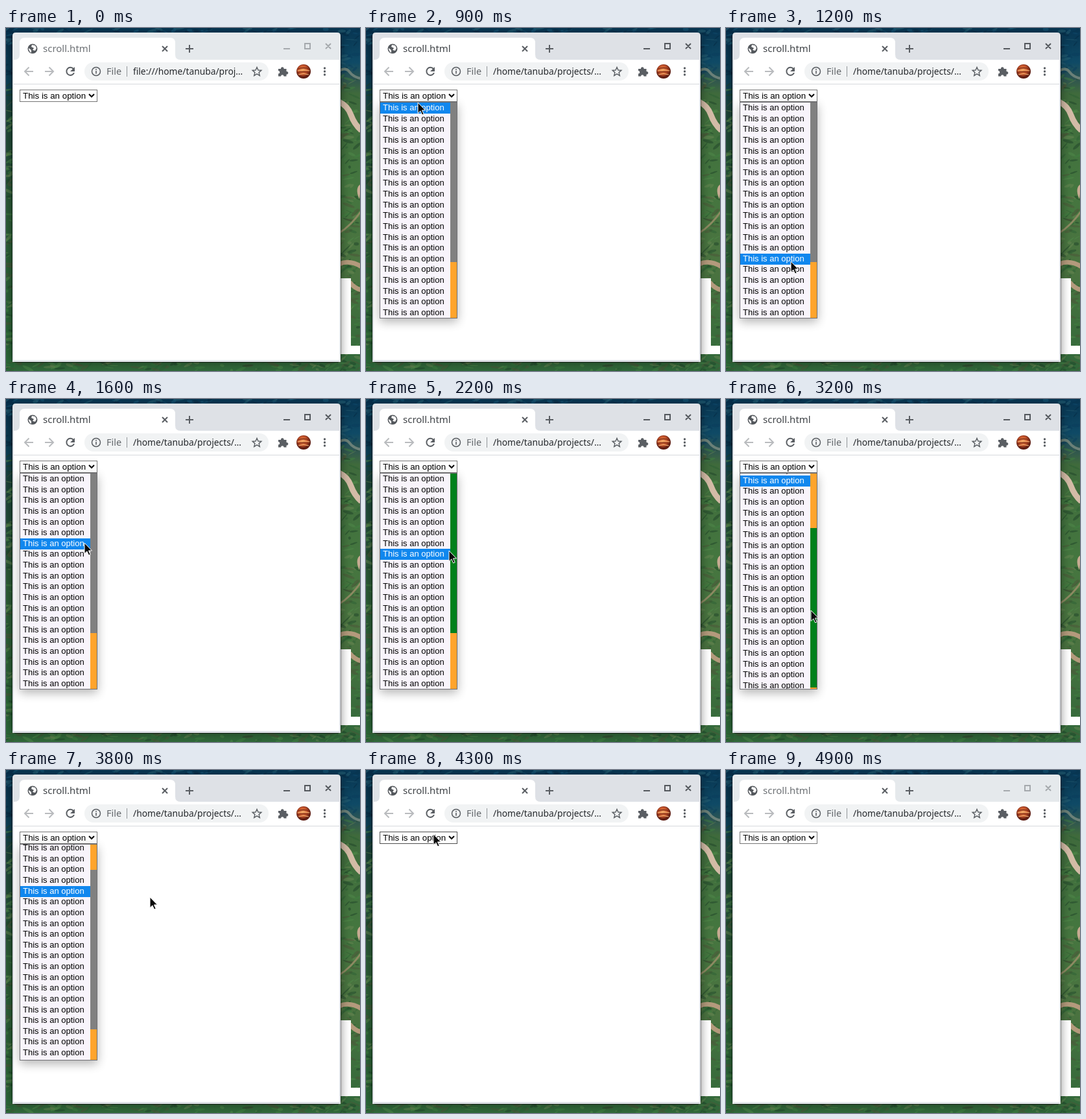
These frames come from a looping animation (546x529 px, 5 s). An HTML page:

```html
<!DOCTYPE html>
<html lang="en">
<head>
<meta charset="utf-8">
<title>Scrolling select</title>
<style>
html, body { margin: 0; width: 100%; height: 100%; overflow: hidden; }
svg { display: block; }
#stage { --bar: #dee1e6; --title: #3f4347; --ctl: #54585d; }
#stage.idle { --bar: #e5e9ec; --title: #6d7175; --ctl: #a5a9ad; }
.bar { fill: var(--bar); }
.ui { font-family: "Noto Sans", "Open Sans", sans-serif; }
.form { font-family: "Liberation Sans", Arial, sans-serif; }
.line { fill: none; stroke: #5a5e63; stroke-width: 2; }
.control { fill: none; stroke: var(--ctl); stroke-width: 2; }
.off { stroke: #b9bbbe; }
</style>
</head>
<body>
<svg id="stage" width="546" height="529" viewBox="0 0 546 529">
  <defs>
    <linearGradient id="land" x2="0" y2="1">
      <stop offset="0" stop-color="#073450"/>
      <stop offset=".1" stop-color="#0f4a66"/>
      <stop offset=".15" stop-color="#2f5550"/>
      <stop offset=".19" stop-color="#3f6a3c"/>
      <stop offset=".45" stop-color="#44763f"/>
      <stop offset=".7" stop-color="#4b7340"/>
      <stop offset="1" stop-color="#30683a"/>
    </linearGradient>
    <linearGradient id="coast" x2="0" y2="1">
      <stop offset="0" stop-color="#062c47"/>
      <stop offset=".16" stop-color="#0c3f55"/>
      <stop offset=".24" stop-color="#1c4439"/>
      <stop offset=".55" stop-color="#2c5c36"/>
      <stop offset="1" stop-color="#2b6637"/>
    </linearGradient>
    <radialGradient id="ball" cx=".45" cy=".4">
      <stop offset="0" stop-color="#f2a05a"/>
      <stop offset=".6" stop-color="#c9552a"/>
      <stop offset="1" stop-color="#5d1c12"/>
    </radialGradient>
    <filter id="blur" x="-50%" y="-50%" width="200%" height="200%"><feGaussianBlur stdDeviation="8"/></filter>
    <filter id="soft"><feGaussianBlur stdDeviation=".7"/></filter>
  </defs>

  <!-- Desktop -->
  <rect width="546" height="529" fill="url(#land)"/>
  <rect width="12" height="529" fill="url(#coast)"/>
  <g filter="url(#soft)">
    <g id="patches"></g>
    <path d="M514 66Q524 60 530 68T548 78" fill="none" stroke="#6b8078" stroke-width="4"/>
    <path d="M514 114Q527 120 532 134T548 158" fill="none" stroke="#d3bba6" stroke-width="9"/>
    <path d="M514 364Q530 357 548 368M530 392Q538 402 548 404" fill="none" stroke="#b49a7c" stroke-width="7"/>
    <path d="M548 240Q537 246 545 264" fill="#c7ab92"/>
    <path d="M514 316Q532 305 548 282" fill="none" stroke="#8d8a62" stroke-width="3"/>
  </g>
  <path d="M514 386H532V490H548V503H514Z" fill="#fff"/>

  <!-- Window -->
  <rect x="11" y="14" width="504" height="500" rx="5" filter="url(#blur)" opacity=".55"/>
  <rect x="9.500" y="7" width="507" height="509" rx="5" opacity=".6"/>
  <path class="bar" d="M10 515V12Q10 7 15 7H511Q516 7 516 12V515Z"/>
  <path d="M13 49Q21 49 21 41V23Q21 15 29 15H253Q261 15 261 23V41Q261 49 269 49H514V512H12V49Z" fill="#fff"/>
  <path d="M12 86.5H514" stroke="#d7d9dc"/>

  <circle cx="41" cy="32" r="7.5" fill="#54585d"/>
  <path d="M35 31l4 3v4l-2-1-2-4zM40 26l-1 3 4 2-2 3 4 1 2-4-2-4z" fill="#fff"/>
  <text class="ui" x="57" y="37" font-size="15" fill="var(--title)">scroll.html</text>
  <path class="line" d="M241 28l8 8m0-8l-8 8"/>
  <path class="line" d="M277 32h12m-6-6v12"/>
  <path class="control" d="M428 32h10M461 24h8v8h-8zM493 24l8 8m0-8l-8 8"/>

  <path class="line off" d="M42 67H29m6.500-6.500L29 67l6.500 6.500M60 67h13m-6.500-6.500L73 67l-6.500 6.500"/>
  <path class="line" d="M104 63A6 6 0 1 0 105 69"/>
  <path d="M106 60v7h-7z" fill="#5a5e63"/>
  <rect x="121" y="53" width="284" height="28" rx="14" fill="#f1f3f4"/>
  <circle class="line" cx="139" cy="67" r="6.500" style="stroke-width:1.500"/>
  <path class="line" d="M139 66v4.500M139 63v1.700" style="stroke-width:1.600"/>
  <g class="ui">
    <text x="155" y="72" font-size="14.500" fill="#63676b">File</text>
    <text id="url" x="196" y="72" font-size="13.800" fill="#25282c"></text>
  </g>
  <path d="M186.500 59v16" stroke="#92969a"/>
  <path class="line" d="M387 60.500l2 4.500 4.800.400-3.700 3.200 1.200 4.800-4.300-2.600-4.300 2.600 1.200-4.800-3.700-3.200 4.800-.400z" style="stroke-width:1.400"/>
  <path d="M420 63h4a2.300 2.300 0 1 1 4.500 0h4v4a2.300 2.300 0 1 1 0 4.500v3h-4a2.200 2.200 0 0 0-4.500 0h-4v-4a2.200 2.200 0 0 0 0-4.500z" fill="#5a5e63"/>
  <circle cx="459" cy="67" r="11" fill="url(#ball)"/>
  <path d="M450 63q9-3 18 0M449 69q10-3 20 0" fill="none" stroke="#7a2a17" stroke-width="1.300"/>
  <path d="M449.500 66q9-3 19 0M451 72q8-3 16 0" fill="none" stroke="#f3bb7c"/>
  <g fill="#5a5e63"><circle cx="491.500" cy="62" r="1.700"/><circle cx="491.500" cy="67" r="1.700"/><circle cx="491.500" cy="72" r="1.700"/></g>

  <!-- Select and its list -->
  <rect id="select" x="21.500" y="95.500" width="119" height="18" fill="#fff"/>
  <text class="form" x="26" y="109" font-size="13.333">This is an option</text>
  <path d="M128 102l4 4 4-4" fill="none" stroke="#000" stroke-width="2"/>
  <g id="popup">
    <rect x="21" y="119" width="120" height="334" filter="url(#blur)" opacity=".3"/>
    <rect x="21.500" y="114.500" width="119" height="333" fill="#f8f4fb" stroke="#707074"/>
    <svg class="form" x="22" y="115" width="118" height="332" font-size="13">
      <g id="rows"></g>
      <rect x="108" width="10" height="332" fill="#ffa42c"/>
      <rect id="thumb" x="108" width="10" height="246"/>
    </svg>
  </g>
  <path id="cursor" d="M0 0V16.500L3.900 12.900L6.600 19L9.200 17.900L6.500 11.900H11.500Z" fill="#0a0a0a" stroke="#fff"/>
</svg>

<script>
const $ = id => document.getElementById(id);
const ROW = 16.63, COUNT = 27, VIEW = 332;

function add(parent, tag, attrs) {
  const node = document.createElementNS("http://www.w3.org/2000/svg", tag);
  set(node, attrs);
  return parent.appendChild(node);
}
function set(node, attrs) {
  for (const name in attrs) node.setAttribute(name, attrs[name]);
}

// Seeded streaks of sea and grass around the window edges
let seed = 7;
const random = () => (seed = seed * 16807 % 2147483647) / 2147483647;
const sea = ["#06283f", "#17597a", "#0a3c5c", "#2a6274"];
const grass = ["#1d4227", "#4f8a4a", "#2c5f33", "#6a8754", "#3f7f3f", "#4c5438"];
for (let i = 0; i < 420; i++) {
  const side = random(), along = random(), across = random();
  const x = side < .25 ? across * 10 : side < .65 ? 516 + across * 30 : along * 546;
  const y = side < .65 ? along * 529 : side < .78 ? across * 7 : 516 + across * 13;
  const palette = y < 75 ? sea : grass;
  add($("patches"), "ellipse", {
    cx: x, cy: y, rx: 2 + random() * 8, ry: .6 + random() * 2, opacity: .5,
    fill: palette[Math.floor(random() * palette.length)],
    transform: `rotate(${random() * 80 - 50} ${x} ${y})`
  });
}

const rows = Array.from({ length: COUNT }, () => {
  const row = add($("rows"), "g", {});
  const back = add(row, "rect", { width: 108, height: 17, fill: "#1087ee" });
  const label = add(row, "text", { x: 4, y: 12 });
  label.textContent = "This is an option";
  return { row, back, label };
});

// Time in tenths of a second, then the pointer tip
const pointer = [
  [4, 80, 104], [9, 80, 115], [10, 84, 165], [11, 92, 255], [12, 100, 360],
  [13, 106, 424], [14, 110, 428], [15, 116, 185], [16, 121, 222], [17, 123, 232],
  [20, 126, 232], [22, 128, 234], [24, 134, 235], [26, 134, 238], [27, 134, 247],
  [28, 133, 271], [29, 132, 291], [32, 131, 326], [33, 130, 303], [34, 130, 273],
  [36, 156, 250], [37, 192, 222], [38, 222, 196], [39, 236, 164], [40, 206, 128],
  [41, 157, 108], [42, 120, 101], [43, 104, 99], [45, 190, 78], [46, 310, 36], [47, 378, 13]
];
const thumbTop = [[0, 0], [26, 6], [27, 18], [28, 40], [29, 57], [32, 84], [33, 61], [34, 39]];
const latest = (table, tick) => table.filter(entry => entry[0] <= tick).pop();

function draw(tick) {
  const [, x, y] = latest(pointer, tick) || [0, 0, 0];
  const top = latest(thumbTop, tick)[1];
  const open = tick >= 6 && tick < 43;
  const idle = tick < 6 || tick >= 49;

  $("stage").classList.toggle("idle", idle);
  $("url").textContent = tick < 6 ? "file:///home/tanuba/proj…" : "/home/tanuba/projects/…";
  const hovered = x > 20 && x < 141 && y < 114;
  set($("select"), { stroke: hovered ? "#4f4f4f" : "#767676" });
  set($("cursor"), {
    transform: `translate(${x} ${y})`,
    visibility: tick >= 4 && tick < 49 ? "visible" : "hidden"
  });
  set($("popup"), {
    visibility: open ? "visible" : "hidden",
    opacity: tick === 6 || tick === 42 ? .5 : 1
  });
  if (!open) return;

  const active = tick < 9 ? 0 : tick < 20 ? Math.max(0, Math.floor((y - 114) / ROW)) : 7;
  const scroll = top * ROW * COUNT / VIEW;
  rows.forEach(({ row, back, label }, i) => {
    set(row, { transform: `translate(0 ${Math.round(i * ROW - scroll)})` });
    set(back, { visibility: i === active ? "inherit" : "hidden" });
    set(label, { fill: i === active ? "#fff" : "#000" });
  });
  set($("thumb"), { y: top, fill: tick >= 22 && tick < 36 ? "#00801c" : "#808080" });
}

function frame() {
  draw(Math.floor(performance.now() % 5000 / 100));
  requestAnimationFrame(frame);
}
frame();
</script>
</body>
</html>
```
